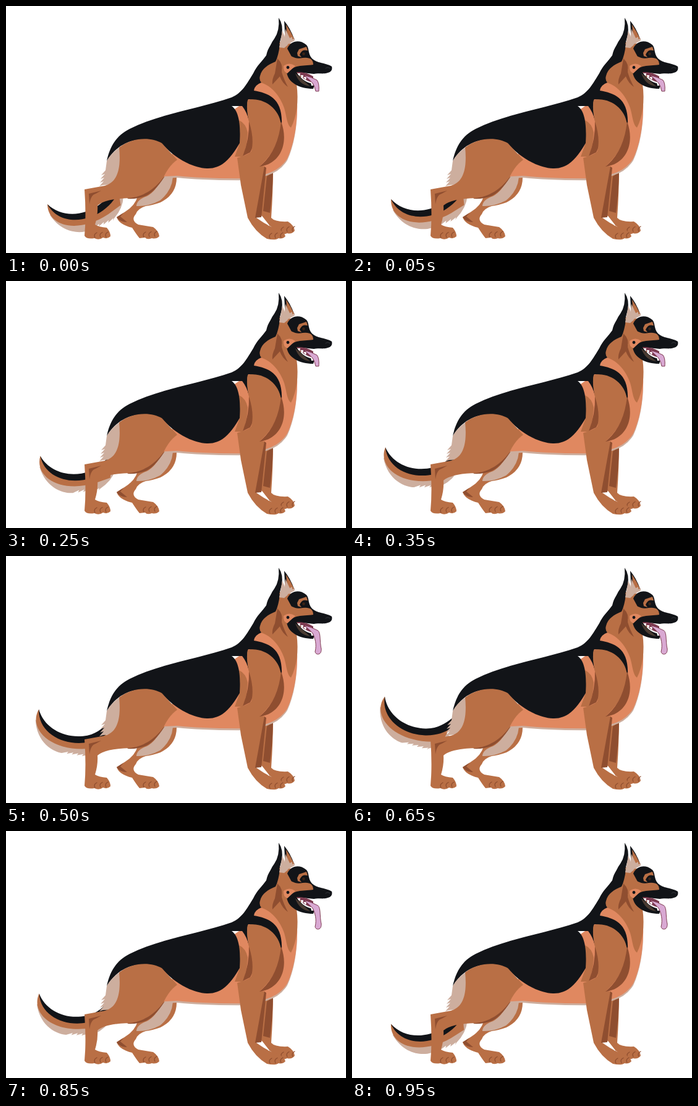
Write an HTML page that moves like this. It is 550 px wide and 400 px high and loops after 1 s.

```html
<!DOCTYPE html>
<html lang="en">
<head>
<meta charset="utf-8">
<title>Dog wagging its tail</title>
<style>
  html, body { margin: 0; width: 100%; height: 100%; overflow: hidden; background: #fff; }
  svg { display: block; width: 100vw; height: 100vh; }
</style>
</head>
<body>
<svg id="stage" viewBox="0 0 550 400"></svg>
<script>
const NS = 'http://www.w3.org/2000/svg';
const TAN = '#b96f45', ORANGE = '#e08860', DARK = '#8f4e30', BLACK = '#121418',
      BEIGE = '#cdae9e', PINK = '#d9a9d3', PLUM = '#7d3a50', WHITE = '#fff';
const stage = document.getElementById('stage');

function add(parent, tag, attrs) {
  const el = document.createElementNS(NS, tag);
  for (const key in attrs) el.setAttribute(key, attrs[key]);
  return parent.appendChild(el);
}
const fill = (color, d, parent = stage) => add(parent, 'path', { d: d + 'Z', fill: color });
const line = (color, width, d) => add(stage, 'path',
  { d, fill: 'none', stroke: color, 'stroke-width': width, 'stroke-linecap': 'round' });
const dot = (color, cx, cy, r) => add(stage, 'circle', { cx, cy, r, fill: color });

// Ragged edge: the same tuft over and over.
const fur = (count, tuft) => ('l' + tuft).repeat(count);

// Three short toe lines, rising a little to the right.
function toes(x, y) {
  for (let i = 0; i < 3; i++) line(DARK, 1.3, `M${x + 9 * i},${y - i / 2}q-3,-5 3,-8`);
}

// Far legs
fill(TAN, `M276,278Q276,305 250,318Q236,323 226,324Q213,328 210,337Q201,347 214,354
  L238,358Q247,364 248,373Q243,378 236,376Q228,379 225,375L216,376
  Q211,370 204,359Q183,354 179,342L193,333Q209,323 213,308L245,275`);
fill(BEIGE, 'M270,277Q268,300 249,315Q230,325 211,324Q211,314 228,308Q243,300 252,278');
fill(DARK, 'M179,342L190,335L185,341L196,350Q184,350 179,342');
toes(223, 374);
fill(TAN, `M412,260L432,264Q432,300 429,343Q435,350 456,349Q466,355 467,364
  Q462,370 455,368Q446,372 442,366L424,354L412,338`);
fill(DARK, 'M422,276L432,269Q431,305 427,335L416,332');
toes(446, 366);

// Tail, drawn in its highest pose and moved from its tip
const TIP = { x: 55, y: 229 };
const tail = add(stage, 'g', {});
fill(BEIGE, `M48,245C46,283 72,300 85,303${fur(5, '11,-1 -3,3')}
  L129,311Q150,306 162,291L150,280L100,290C75,280 60,260 48,245`, tail);
fill(TAN, 'M55,229C35,257 64,297 125,300L150,300L160,280L122,285C85,285 58,262 55,229', tail);
fill(BLACK, `M55,229C60,258 88,279 122,279C142,279 154,270 165,261
  L165,276Q148,290 122,290C85,290 50,265 55,229`, tail);

// Torso: the light trim is the same outline a little lower
const torso = `M255,276Q264,260 270,235L380,160L396,133L412,118L468,122
  C475,165 470,215 455,247Q444,265 421,272L400,279Q320,280 277,275`;
add(stage, 'path', { d: torso + 'Z', fill: BEIGE, transform: 'translate(0 3)' });
fill(ORANGE, torso);
fill(TAN, 'M377,185Q388,190 391,205Q390,228 383,244L370,244L378,222');

// Neck and saddle
fill(TAN, `M412,124C432,130 444,148 450,165C454,178 454,192 461,197
  C470,180 474,155 470,126L480,110L470,62L440,58L405,108`);
fill(DARK, 'M439,85Q449,94 446,107Q449,118 456,131Q447,125 443,114L431,127Q430,119 435,109');
fill(BLACK, `M163,251C168,228 178,210 200,199C250,174 310,167 365,148
  C382,141 390,125 400,109C406,96 414,90 421,80Q423,70 429,62L443,62Q441,80 436,90
  C424,95 414,101 411,113Q409,119 413,124Q402,128 401,137C425,141 448,150 446,192
  C437,172 425,152 392,151Q388,158 393,186Q390,172 382,162L365,162
  C380,172 379,205 378,222C366,242 352,264 325,263C300,262 272,245 252,223
  C220,210 185,215 163,251`);

// Rump and near hind leg
fill(BEIGE, `M185,228Q170,238 163,251L161,266${fur(4, '-7,8 6,-2')}L175,289L190,255`);
fill(DARK, 'M256,277Q240,302 225,308Q212,313 196,312L240,285');
fill(TAN, `M183,229C205,212 235,212 252,222L277,249Q264,258 255,277
  C240,298 220,309 200,311Q160,312 148,323Q149,338 144,354
  Q150,358 163,359Q169,366 169,373Q164,378 157,375Q150,380 143,376Q130,378 127,372
  Q130,340 127,297L160,291C182,285 186,260 183,229`);
fill(DARK, 'M134,304L154,299L145,304Q137,306 135,321');
toes(144, 375);

// Shoulder and near front leg
fill(DARK, 'M393,186Q406,220 395,237L383,243Q394,215 393,186');
fill(TAN, `M391,152C420,147 445,170 445,195Q442,230 411,259L419,260L405,343
  Q416,351 428,357L440,361Q450,366 452,373Q447,378 441,376Q436,380 422,377
  Q403,366 391,343L380,290L374,246Q394,240 397,235Q402,215 393,187Q388,165 391,152`);
fill(DARK, 'M445,187C458,222 444,256 410,260Q440,236 445,187');
fill(DARK, 'M418,260L421,262L413,342L403,343');
line(WHITE, 1.4, 'M414,341L425,355');
toes(427, 376);

// Ears
fill(BLACK, 'M450,24Q460,36 466,53L452,60');
fill(TAN, 'M453,30Q460,40 466,53L456,58');
fill(BEIGE, `M452,37L459,52${fur(2, '4,-2 0,4')}L456,62L449,62`);
fill(BLACK, 'M441,19Q449,30 446,47L442,62L438,69L424,76Q427,62 434,53Q443,40 441,19');
fill(BEIGE, 'M447,40L456,63L450,68L442,67');

// Head and muzzle
fill(BLACK, `M455,69C460,57 474,53 486,63C491,69 488,77 495,85C503,93 518,92 527,98
  Q529,106 521,108C512,111 505,108 498,110L470,107Q482,126 500,126L497,134
  C475,134 455,124 454,106L462,82`);
fill(TAN, 'M450,78C464,80 466,87 480,84Q497,82 497,95C478,98 466,94 455,109L446,104');
fill(ORANGE, 'M449,97Q458,90 468,97L455,109Q448,106 449,97');
fill(TAN, 'M471,76L474,70L486,66L488,72Q478,70 475,79L478,83L472,81');
dot(BLACK, 483, 77, 5.5);
dot('#3d2417', 481.5, 77.5, 2.2);
dot(BLACK, 456, 99.5, 2.4);
line('#34363c', 1, 'M517,101Q520,98 524,101');

// Mouth
fill('#4a3b32', 'M468,109L492,130Q474,128 468,109');
fill(PLUM, 'M470,107Q485,106 497,114L497,124Q483,122 470,107');
for (let i = 0; i < 3; i++) fill(WHITE, `M${471 + 5 * i},${109 + 3 * i}l5,0l-1,5`);
fill(WHITE, 'M493,123l3,-1l1,7l-3,0');

const tongue = end => add(stage, 'path', {
  d: `M482,112Q494,115 503,120${end}Q494,122 482,112Z`, fill: PINK, stroke: PLUM, 'stroke-width': 1
});
const shortTongue = tongue('Q507,125 506,138L501,138Q500,131 496,125');
const longTongue = tongue('C510,122 507,138 510,150C511,161 501,161 500,155C503,143 500,133 496,125');

const LOOP = 1000, STEP = 50, PEAK = 750, TONGUE_OUT = 500;

// How far the tail is raised: a slow rise, then a quick drop.
function lift(t) {
  return t <= PEAK ? (t / PEAK) ** 0.95 : 1 - 1.15 * (t - PEAK) / (LOOP - PEAK);
}

function draw(ms) {
  const t = Math.floor((ms % LOOP) / STEP) * STEP;
  const up = lift(t), low = 1 - up;
  const x = 53 + 14 * low ** 4, y = 321 - 107 * up, angle = 5 - 41 * low ** 1.2;
  tail.setAttribute('transform', `translate(${x} ${y}) rotate(${angle}) translate(${-TIP.x} ${-TIP.y})`);
  const out = t >= TONGUE_OUT;
  shortTongue.setAttribute('display', out ? 'none' : 'inline');
  longTongue.setAttribute('display', out ? 'inline' : 'none');
}

let start = null;
function tick(now) {
  if (start === null) start = now;
  draw(now - start);
  requestAnimationFrame(tick);
}
draw(0);
requestAnimationFrame(tick);
</script>
</body>
</html>
```
